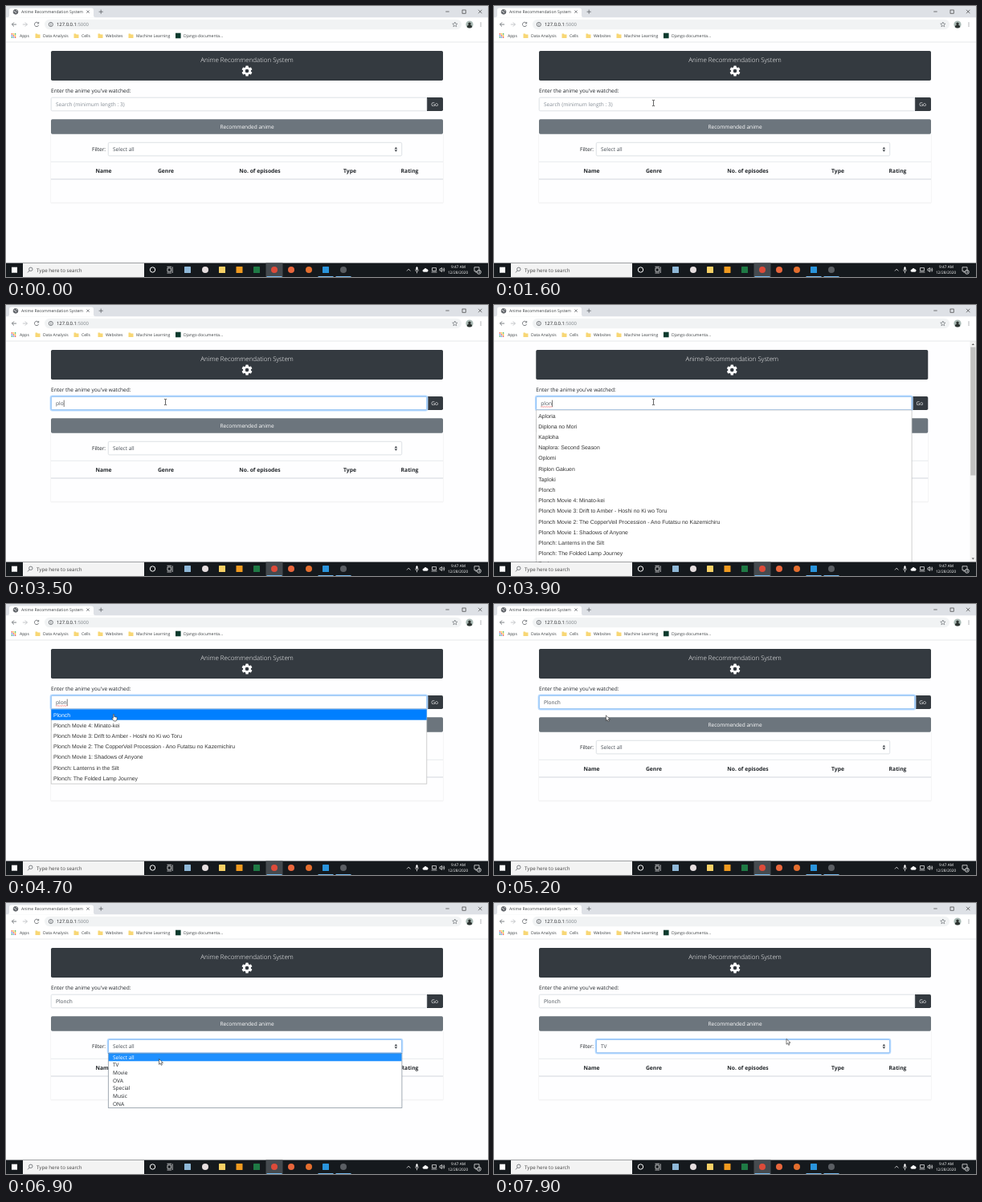
An HTML page for the animation above (8000 ms loop, 600 px wide and 338 px high).

```html
<!DOCTYPE html>
<html lang="en">
<head>
<meta charset="utf-8">
<title>Anime Recommendation System</title>
<style>
  html, body { margin: 0; width: 100%; height: 100%; overflow: hidden; background: #fff; }
  svg { display: block; width: 600px; height: 338px; }
  text { font: 6.55px "Open Sans", sans-serif; fill: #212529; text-rendering: geometricPrecision; white-space: pre; }
  .tab { font-size: 5.08px; fill: #3c4043; }
  .url { font-size: 5.9px; fill: #202124; }
  .title { font-size: 7.95px; font-weight: 300; fill: #fff; }
  .th { font-size: 6.75px; font-weight: 700; }
  .mid { text-anchor: middle; }
  .light { fill: #fff; }
  .field { fill: #495057; }
  .hint { fill: #868e96; }
  .ui { font: 6.88px "Liberation Sans", Arial, sans-serif; fill: #333; }
  .clock { font-size: 4.75px; fill: #fff; }
  .line { fill: none; stroke: #5f6368; stroke-width: .8; }
  .tray { fill: none; stroke: #fff; stroke-width: .7; }
</style>
</head>
<body>
<svg viewBox="0 0 600 338">
  <rect width="600" height="338" fill="#fefeff"/>

  <g id="page">
    <g fill="none" stroke="#000">
      <path d="M55.6 160V245.3H544.4V160" stroke-opacity=".05" stroke-width=".9"/>
      <path d="M56 246.1H544" stroke-opacity=".03"/>
    </g>
    <rect x="56" y="56" width="488" height="37" rx="1.8" fill="#343a40"/>
    <text class="title mid" x="300" y="70.4">Anime Recommendation System</text>
    <g id="gear" transform="translate(300 81)" fill="#fff"><circle r="5"/></g>
    <text x="56" y="107.6">Enter the anime you've watched:</text>

    <path d="M524 114h18.2a1.8 1.8 0 0 1 1.8 1.8v13.4a1.8 1.8 0 0 1-1.8 1.8H524z" fill="#343a40"/>
    <text class="mid light" x="533.6" y="125.2">Go</text>
    <rect x="56.2" y="114.2" width="467.6" height="16.6" rx="1.5" fill="#fff" stroke="#ced4da" stroke-width=".7"/>
    <g id="inputGlow" fill="none">
      <rect x="55.3" y="113.3" width="469.4" height="18.4" rx="2.2" stroke="#bfdeff" stroke-width="1.4"/>
      <rect x="56.2" y="114.2" width="467.6" height="16.6" rx="1.5" stroke="#6cb2fb" stroke-width=".8"/>
    </g>
    <text id="value" x="62" y="125.4"></text>
    <path id="squiggle" fill="none" stroke="#e33" stroke-width=".5"/>
    <rect id="caret" y="118.6" width=".6" height="8.4" fill="#222"/>

    <rect x="56" y="141.3" width="488" height="18.5" rx="1.8" fill="#6c757d"/>
    <text class="mid light" x="300" y="153.3">Recommended anime</text>

    <text x="107" y="181.4">Filter:</text>
    <rect x="127.3" y="170.3" width="365.4" height="16.6" rx="1.5" fill="#fff" stroke="#ced4da" stroke-width=".7"/>
    <g id="selectGlow" fill="none">
      <rect x="126.4" y="169.4" width="367.2" height="18.4" rx="2.2" stroke="#bfdeff" stroke-width="1.4"/>
      <rect x="127.3" y="170.3" width="365.4" height="16.6" rx="1.5" stroke="#6cb2fb" stroke-width=".8"/>
    </g>
    <text id="choice" class="field" x="133" y="181.4"></text>
    <path d="M483.6 178.2l1.8-2.3 1.8 2.3zM483.6 179.4l1.8 2.3 1.8-2.3z" fill="#343a40"/>

    <path d="M56 194.3H544" stroke="#dee2e6" stroke-width=".7"/>
    <path d="M56 216H544" stroke="#d3d8dd" stroke-width="1.1"/>
    <g class="heads"></g>

    <g id="suggest"></g>
    <g id="options"></g>
  </g>

  <g id="scrollbar">
    <rect x="592.5" y="45" width="7.5" height="276" fill="#f1f1f1"/>
    <rect x="593.2" y="52.5" width="6.2" height="160" fill="#c1c1c1"/>
    <path d="M594.6 50l1.7-2 1.7 2zM594.6 315.5l1.7 2 1.7-2z" fill="#606060"/>
  </g>

  <!-- browser frame -->
  <rect width="600" height="14.5" fill="#dee1e6"/>
  <path d="M1 14.5q3 0 3-3V5q0-2.500 3-2.500H106q3 0 3 2.500v6.500q0 3 3 3z" fill="#fff"/>
  <g class="line" stroke-width=".7">
    <circle cx="12" cy="7.300" r="2.900" fill="#5f6368"/>
    <path d="M9.800 6.500l2 .6.6 1.800M12.500 5l1.500 1.300" stroke="#fff"/>
    <path d="M100.300 5.500l3.400 3.400m0-3.400l-3.400 3.400M115.600 7.200h5.200m-2.600-2.600v5.200"/>
    <g stroke="#222" stroke-width=".6"><path d="M547.300 7h4.400M588 4.800l4.400 4.400m0-4.400L588 9.200"/><rect x="568" y="5" width="4.200" height="4.200"/></g>
  </g>
  <text class="tab" x="19" y="9">Anime Recommendation System</text>

  <rect y="14.500" width="600" height="30.500" fill="#fff"/>
  <rect x="48" y="16.800" width="519" height="12.400" rx="6.200" fill="#f1f3f4"/>
  <path d="M0 45H600" stroke="#dcdee1" stroke-width=".7"/>
  <g class="line">
    <path d="M13 23H7.400m2.600-2.600L7.400 23l2.600 2.600"/>
    <path d="M20.800 23h5.600m-2.600-2.600l2.600 2.600-2.600 2.600" stroke="#b6b9bd"/>
    <path d="M40.300 21.300A2.700 2.700 0 1 0 40.700 23.800M40.700 19.900v2h-2"/>
    <circle cx="55.800" cy="23" r="2.600"/><path d="M55.800 22.500v2M55.800 21.200v.7"/>
    <path d="M558.800 20l.9 2 2.200.2-1.700 1.400.5 2.200-1.900-1.200-1.900 1.200.5-2.200-1.700-1.400 2.200-.2z" stroke-width=".6"/>
  </g>
  <text class="url" x="63" y="25.200">127.0.0.1<tspan fill="#80868b">:5000</tspan></text>
  <circle cx="577" cy="23" r="4.600" fill="#a9b9b4"/>
  <path d="M573.700 26.200q.5-2.400 2.300-2.600a1.700 1.700 0 1 1 2 0q1.800.2 2.300 2.600a4.600 4.600 0 0 1-6.600 0z" fill="#2c3330"/>
  <g fill="#5f6368"><circle cx="591" cy="21" r=".6"/><circle cx="591" cy="23" r=".6"/><circle cx="591" cy="25" r=".6"/></g>
  <g id="marks"></g>

  <!-- taskbar -->
  <rect y="320.500" width="600" height="17.500" fill="#15191d"/>
  <rect x="7" y="325.700" width="7" height="7" fill="#fff"/>
  <rect x="21" y="320.800" width="151" height="17.200" fill="#f3f3f3"/>
  <g class="line" stroke="#333"><circle cx="30.800" cy="328.300" r="2.200"/><path d="M29.200 330l-2.200 2.400"/></g>
  <text x="38" y="331.700" style="font-size:6.200px;fill:#444">Type here to search</text>
  <rect x="323.500" y="320.500" width="21" height="17.500" fill="#454a4f"/>
  <g id="apps"></g>
  <g class="tray">
    <circle cx="182.500" cy="329" r="3.200" stroke-width="1"/>
    <path d="M201 327h4.400v4.200H201zM200.500 325.300h5.400M200.500 333h5.400M207.200 325.300v7.700"/>
    <path d="M499 330.500l2.200-2.400 2.200 2.400"/>
    <path d="M509.800 328.600q0 2.700 1.700 2.700t1.700-2.700M511.500 331.300v2"/><rect x="510.800" y="325.600" width="1.400" height="3.600" rx=".7" fill="#fff"/>
    <path d="M520 331.300a1.200 1.200 0 0 1 .2-2.400 2 2 0 0 1 3.700-.3 1.400 1.400 0 0 1 .4 2.700z" fill="#fff"/>
    <path d="M530.500 326.600h5v3.700h-5zM529.600 332h6.800"/>
    <path d="M540 327.900h1l1.400-1.500v5.200l-1.400-1.500h-1zM543.800 327.500q1 1.500 0 3M545 326.500q1.700 2.500 0 5"/>
    <path d="M583 325.800h6v5h-2.500l-1.500 1.600v-1.600h-2z"/>
    <circle cx="588.800" cy="331.800" r="2.500" fill="#2b3035"/>
  </g>
  <text class="clock mid" x="563" y="327">9:47 AM</text>
  <text class="clock mid" x="562.500" y="334.100">12/28/2020</text>
  <text class="clock mid" x="588.800" y="333.300" style="font-size:4px">3</text>

  <g id="pointer">
    <path id="arrow" d="M0 0v6.800l1.600-1.500 1.100 2.500 1.200-.5-1.100-2.500h2.200z" fill="#fff" stroke="#222" stroke-width=".6"/>
    <path id="beam" d="M-1.600-3.600H-.4L0-3.200.4-3.600H1.600M0-3.200V3.200M-1.600 3.600H-.4L0 3.200.4 3.600H1.600" fill="none" stroke="#222" stroke-width=".7"/>
    <path id="hand" d="M-.7 5V.6q0-.8.7-.8t.7.800V3l3 .7q.7.200.6 1l-.5 2.700-.8 1.100H.3L-2.200 5.200q.5-.9 1.500-.2z" fill="#fff" stroke="#222" stroke-width=".6"/>
  </g>
</svg>

<script>
const $ = id => document.getElementById(id);
const add = (node, markup) => node.insertAdjacentHTML('beforeend', markup);
const show = (node, on) => node.setAttribute('visibility', on ? 'visible' : 'hidden');

// ---- static parts ----
for (const a of [0, 60, 120])
  add($('gear'), `<rect x="-1.7" y="-6.5" width="3.4" height="13" rx=".5" transform="rotate(${a})"/>`);
add($('gear'), '<circle r="2.3" fill="#343a40"/>');

[['Name', 121.5], ['Genre', 199], ['No. of episodes', 316], ['Type', 428], ['Rating', 502.5]].forEach(([s, x]) =>
  add(document.querySelector('.heads'), `<text class="th mid" x="${x}" y="207.900">${s}</text>`));

const dots = ['#ea4335', '#fbbc05', '#34a853', '#4285f4'];
for (let i = 0; i < 9; i++)
  add($('marks'), `<rect x="${6.7 + i % 3 * 2.1}" y="${34.2 + (i / 3 | 0) * 2.1}" width="1.4" height="1.4" fill="${dots[i % 4]}"/>`);
[['Apps', 17], ['Data Analysis', 46], ['Cells', 94], ['Websites', 124], ['Machine Learning', 162], ['Django documenta...', 221]].forEach(([s, x], i) => {
  add($('marks'), `<text class="tab" x="${x}" y="38.900">${s}</text>`);
  if (i > 0 && i < 5)
    add($('marks'), `<path d="M${x - 9.5} 34.600h2.300l.8.800h2.900v4.600h-6z" fill="#f8d775"/>`);
});
add($('marks'), '<rect x="211" y="33.700" width="6.600" height="6.600" fill="#0c3b2e"/>');

[[226, '#8fb8d8'], [248, '#e6dedf', 1], [269, '#f7d065'], [290.5, '#f09a1f'], [312, '#1f7a45'], [334, '#dd4b3a', 1],
 [355, '#e8663c', 1], [377, '#e46e2e', 1], [398, '#2a94dc'], [420, '#5a5e63', 1]].forEach(([x, color, round]) =>
  add($('apps'), `<rect x="${x - 4}" y="325" width="8" height="8" rx="${round ? 4 : .6}" fill="${color}"/>`));
for (const x of [334, 398, 420])
  add($('apps'), `<rect x="${x - 9.5}" y="337" width="19" height="1" fill="#76b9ed"/>`);

// ---- lists ----
const name = 'Plonch';
const titles = [name, ...[
  ' Movie 4: Minato-kei',
  ' Movie 3: Drift to Amber - Hoshi no Ki wo Toru',
  ' Movie 2: The CopperVeil Procession - Ano Futatsu no Kazemichiru',
  ' Movie 1: Shadows of Anyone',
  ': Lanterns in the Silt',
  ': The Folded Lamp Journey'].map(s => name + s)];
const wide = ['Aploria', 'Diplona no Mori', 'Kaploha', 'Naplora: Second Season', 'Oplomi', 'Riplon Gakuen', 'Taploki', ...titles, 'Zaplon'];
const types = ['Select all', 'TV', 'Movie', 'OVA', 'Special', 'Music', 'ONA'];

function fillSuggest(rows, active) {
  const pitch = 13.2, top = 131.3;
  $('suggest').innerHTML = `<rect x="56.200" y="131" width="467.600" height="${rows.length * pitch + .8}" fill="#fff" stroke="#bcbcbc" stroke-width=".7"/>` +
    rows.map((s, i) => (i === active ? `<rect x="56.300" y="${top}" width="467.400" height="13.400" fill="#007fff"/>` : '') +
      `<text class="ui" x="59" y="${140.6 + i * pitch}"${i === active ? ' style="fill:#fff"' : ''}>${s}</text>`).join('');
}

function fillOptions(active) {
  const pitch = 9.67;
  $('options').innerHTML = '<rect x="127.300" y="187.400" width="365.600" height="68" fill="#fff" stroke="#7b8894" stroke-width=".7"/>' +
    types.map((s, i) => (i === active ? `<rect x="127.700" y="${187.6 + i * pitch}" width="364.800" height="${pitch}" fill="#1e90ff"/>` : '') +
      `<text x="133" y="${194.8 + i * pitch}"${i === active ? ' style="fill:#fff"' : ''}>${s}</text>`).join('');
}

// ---- timeline ----
const LOOP = 8000, STEP = 100;
const typed = [[0, ''], [2900, 'p'], [3100, 'pl'], [3300, 'plo'], [3900, 'plon'], [4800, name]];
const route = [[900, 461, 338], [1600, 198.5, 121], [4100, 198.5, 121], [4600, 134, 137.5], [5100, 134, 137.5], [6000, 292.5, 178.5],
  [6300, 292.5, 178.5], [6900, 190.5, 194.5], [7100, 191, 201], [7500, 191, 201], [7900, 364, 169.5]];
const ramp = (t, a, b) => Math.min(1, Math.max(0, (t - a) / (b - a)));
const within = (t, a, b) => t >= a && t < b;

function pointerAt(t) {
  const i = route.findIndex(k => k[0] >= t);
  if (i < 1) return i ? route[route.length - 1].slice(1) : route[0].slice(1);
  const [a, x, y] = route[i - 1], [b, u, v] = route[i];
  const p = ramp(t, a, b), e = p * p * (3 - 2 * p);
  return [x + (u - x) * e, y + (v - y) * e];
}

function render(t) {
  const [x, y] = pointerAt(t);
  const kind = t >= 1500 && t < 4800 ? (y < 130 ? 'beam' : 'hand') : 'arrow';
  $('pointer').setAttribute('transform', `translate(${x} ${y})`);
  for (const id of ['arrow', 'beam', 'hand']) show($(id), id === kind && t >= 1000);

  const text = typed.filter(k => k[0] <= t).pop()[1];
  const value = $('value');
  value.textContent = text || 'Search (minimum length : 3)';
  value.setAttribute('class', text ? 'field' : 'hint');
  const width = text ? value.getComputedTextLength() : 0;
  $('caret').setAttribute('x', 62.2 + width);
  show($('caret'), within(t, 1900, 2400) || within(t, 2900, 5200) || within(t, 5700, 6100));
  show($('squiggle'), within(t, 3900, 4800));
  $('squiggle').setAttribute('d', 'M62 127.400' + 'l.8-.8.8.8'.repeat(Math.max(1, Math.round(width / 1.6))));

  $('inputGlow').setAttribute('opacity', ramp(t, 1740, 1960) * (1 - ramp(t, 6040, 6200)));
  $('selectGlow').setAttribute('opacity', ramp(t, 6040, 6200));

  const long = within(t, 3600, 4100), short = within(t, 4100, 4800);
  if (long) fillSuggest(wide, -1);
  else if (short) fillSuggest(titles, y > 131 ? 0 : -1);
  else $('suggest').innerHTML = '';
  show($('scrollbar'), long);
  $('page').setAttribute('transform', `translate(${long ? -3.73 : 0} 0)`);

  if (within(t, 6100, 7300)) fillOptions(y > 197 ? 1 : 0);
  else $('options').innerHTML = '';
  $('choice').textContent = types[t >= 7300 ? 1 : 0];
}

const start = performance.now();
let last = -1;
function tick() {
  const t = Math.floor((performance.now() - start) % LOOP / STEP) * STEP;
  if (t !== last) render(last = t);
  requestAnimationFrame(tick);
}
tick();
</script>
</body>
</html>
```
